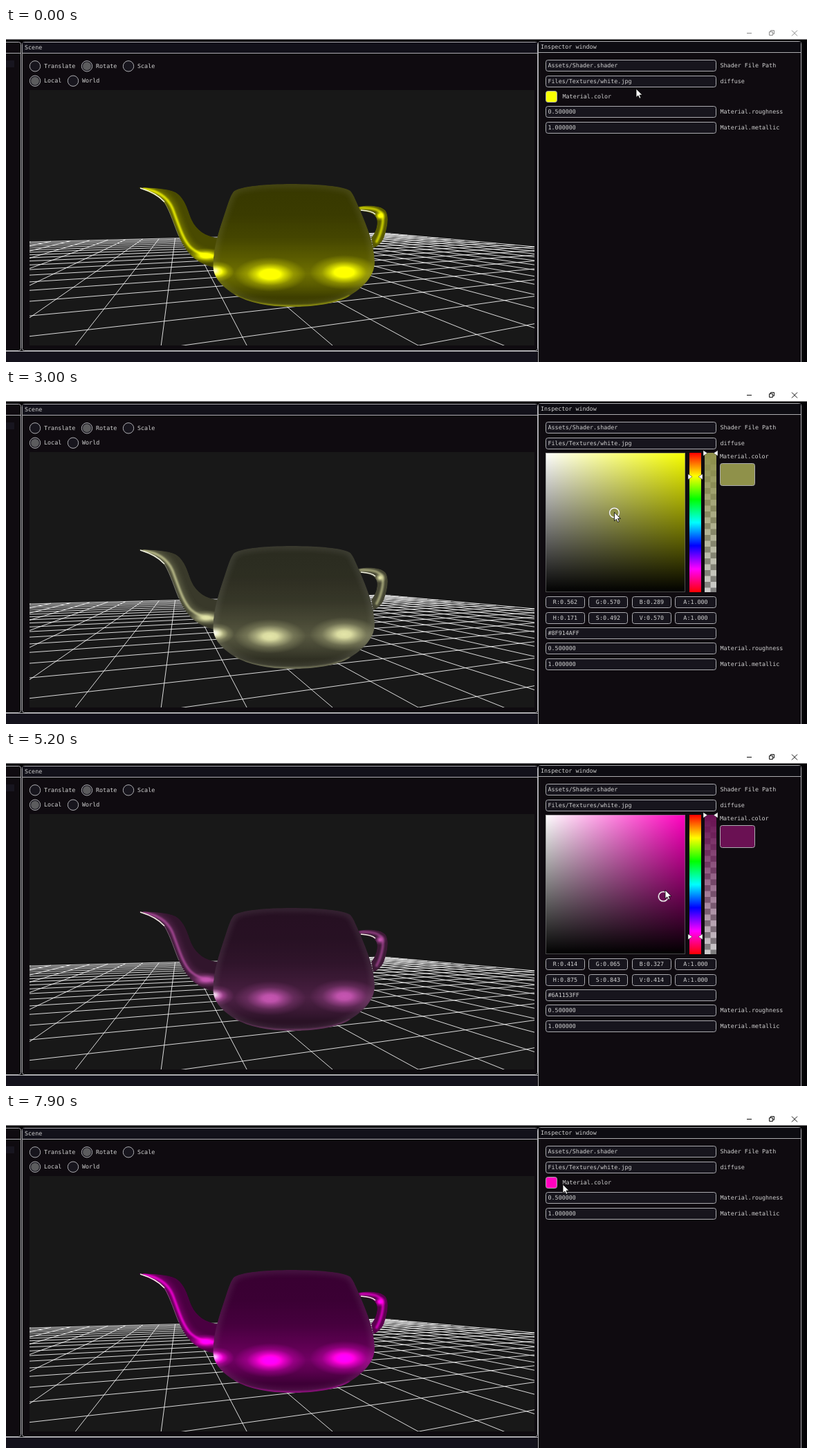
An HTML page for the animation above (8000 ms loop, 1158 by 484 pixels).

```html
<!DOCTYPE html>
<html lang="en">
<head>
<meta charset="utf-8">
<title>Material inspector</title>
<style>
  html, body { margin: 0; width: 100%; height: 100%; overflow: hidden; background: #000; }
  svg { display: block; width: 1158px; height: 484px; }
  text { font: 8.4px "DejaVu Sans Mono", monospace; fill: #d2d2d2; text-rendering: geometricPrecision; white-space: pre; }
  .panel { fill: #0f0b10; stroke: #acacb0; }
  .field { fill: #17151d; stroke: #acacb0; }
  .mid { text-anchor: middle; }
</style>
</head>
<body>
<svg id="stage" viewBox="0 0 1158 484" xmlns="http://www.w3.org/2000/svg"></svg>
<script>
const LOOP = 8000, STEP = 100;
const SV = { x: 780, y: 91, size: 202 };
const stage = document.getElementById("stage");

// ---- markup helpers ----
const label = (x, y, s, extra = "") => `<text x="${x}" y="${Math.floor(y + 3)}" ${extra}>${s}</text>`;
const box = (x, y, w, h, cls, extra = "") =>
  `<rect x="${x + .5}" y="${Math.floor(y) + .5}" width="${w - 1}" height="${h - 1}" rx="3" class="${cls}" ${extra}/>`;
const field = (y, s, name, id = "") =>
  box(780, y - 8, 247, 17, "field") + label(783.5, y, s, id && `id="${id}"`) + label(1032.5, y, name);
const stops = list => list.map(([o, c, a = 1]) =>
  `<stop offset="${o}" stop-color="${c}" stop-opacity="${a}"/>`).join("");
const gray = v => `rgb(${[v, v, v].map(n => Math.round(n * 255))})`;
const radio = (x, y, name, on) =>
  `<circle cx="${x}" cy="${y}" r="7.7" class="field"/>` +
  (on ? `<circle cx="${x}" cy="${y}" r="6" fill="#5c5c5e"/>` : "") + label(x + 13, y, name);

// ---- floor grid in two-point perspective ----
function grid() {
  const vpA = 1608, vpB = 249, horizon = 270, lift = 719;
  const a = .345, b = .948, farU = 16.8, farV = 21.97, near = lift / 320;
  const at = (u, v) => {
    const d = a * u + b * v;
    return `${((a * u * vpA + b * v * vpB) / d).toFixed(1)} ${(horizon + lift / d).toFixed(1)}`;
  };
  let d = "";
  for (let i = 0; i < 50; i++) {
    const u = farU - i, v = farV - i;
    const v0 = (near - a * u) / b;
    if (v0 < farV) d += `M${at(u, v0)}L${at(u, farV)}`;
    const u0 = (near - b * v) / a;
    if (u0 < farU) d += `M${at(u0, v)}L${at(farU, v)}`;
  }
  return `<path d="${d}" fill="none" stroke="#fff" stroke-width=".85"/>`;
}

// ---- teapot: gray shading, tinted by a filter ----
const BODY = "M330 236C342 229 375 226 413 226C452 226 488 229 498 236C503 242 507 253 512 264" +
  "C522 288 533 314 533 340C533 360 515 377 497 388C477 400 445 404 413 404C380 404 350 398 330 386" +
  "C312 375 300 362 299.500 345C299 318 309 290 318 263C322 251 325 241 330 236Z";
const SPOUT = "M191 231C212 232 233 232 245 238C260 247 263 266 269 279C275 292 288 302 306 304" +
  "L306 348C286 345 270 336 259 319C246 299 242 275 230 255C221 243 207 238 191 231Z";
const HANDLE = "M509 259C524 256 543 257 549 265C554 273 552 288 547 302C544 311 538 316 531 319" +
  "L528 304C534 297 538 286 536 277C534 269 524 266 511 265Z";
const SPOUT_LINE = "M198 232.500C218 236 233 243 241 262C250 286 256 307 267 318C277 327 288 331 304 331";
const line = (d, w, c, blur, more = "") =>
  `<path d="${d}" fill="none" stroke="${c}" stroke-width="${w}" filter="url(#blur${blur})" ${more}/>`;
const glow = (x, y, rx, ry) => `<ellipse cx="${x}" cy="${y}" rx="${rx}" ry="${ry}" fill="url(#glow)"/>`;

const teapot = `
  <g filter="url(#tint)">
    <g clip-path="url(#spoutClip)">
      <path d="${SPOUT}" fill="${gray(.25)}"/>
      ${line(SPOUT_LINE, 13, gray(.38), 3)}
      ${line(SPOUT_LINE, 3.4, gray(.8), 1)}
      ${glow(289, 330, 26, 11)}
    </g>
    <g clip-path="url(#handleClip)">
      <path d="${HANDLE}" fill="${gray(.3)}"/>
      ${line("M511 261C527 260 539 262 544 270C547 280 542 299 535 311", 3.5, gray(.7), 1)}
      ${glow(541, 272, 9, 8)}
    </g>
    <g clip-path="url(#bodyClip)">
      <path d="${BODY}" fill="url(#bodyShade)"/>
      ${glow(382, 357, 52, 25)}${glow(489, 354, 50, 25)}${glow(305, 353, 25, 15)}
      ${line("M330 387C350 399 380 403 413 403C445 403 477 399 497 388", 2.5, gray(.52), 1)}
    </g>
  </g>
  <g clip-path="url(#bodyClip)">
    ${line(BODY, 7, "#fff", 5, 'opacity=".12"')}
    <ellipse cx="301" cy="352" rx="13" ry="9" fill="url(#glow)" opacity=".75"/>
  </g>
  ${line("M194 232C211 237 221 243 229 252", 1.6, "#f2f2e4", 0)}
  ${line("M229 252C239 270 243 286 250 302", 1, "#fff", 0, 'opacity=".3"')}
  ${line("M513 264C523 264.500 530 266 534 270", 1.6, "#f2f2e4", 0)}`;

// ---- picker ----
const hueStops = stops(["#f00", "#ff0", "#0f0", "#0ff", "#00f", "#f0f", "#f00"].map((c, i) => [i / 6, c]));
const arrows = (x, w) => `<path d="M${x - 2} -4l6 4l-6 4zM${x + w + 2} -4l-6 4l6 4z" fill="#fff" stroke="#222" stroke-width=".5"/>`;
const cells = [[780, 57], [842, 57], [905, 57], [967, 60]];
const valueRow = (y, id) => cells.map(([x, w], i) =>
  box(x, y - 8, w, 17, "field") + label(x + w / 2, y, "", `class="mid" id="${id}${i}"`)).join("");
const bar = (x, w, fill) => `<rect x="${x}" y="91" width="${w}" height="202" fill="${fill}"/>`;

const picker = `
  ${bar(780, 202, "url(#tone)")}${bar(780, 202, "url(#dark)")}
  <rect x="780.5" y="91.500" width="201" height="201" fill="none" stroke="#777" stroke-opacity=".6"/>
  <circle id="markRim" fill="none" stroke="#808080" stroke-opacity=".6"/>
  <circle id="mark" stroke="#fff" stroke-width="1.3"/>
  ${bar(988, 17, "url(#hues)")}<g id="hueMark">${arrows(988, 17)}</g>
  ${bar(1010, 17, "url(#checks)")}${bar(1010, 17, "url(#fade)")}
  <g transform="translate(0 91.500)">${arrows(1010, 17)}</g>
  ${label(1032, 96, "Material.color")}
  ${box(1032, 106, 51, 33, "field", 'id="bigSwatch"')}
  ${valueRow(307.5, "rgb")}${valueRow(330, "hsv")}
  ${field(352, "", "", "hex")}
  ${field(374.5, "0.500000", "Material.roughness")}${field(397, "1.000000", "Material.metallic")}`;

const compact = `
  ${box(780, 91, 17, 17, "field", 'id="swatch"')}${label(804.5, 99.5, "Material.color")}
  ${field(121.5, "0.500000", "Material.roughness")}${field(144, "1.000000", "Material.metallic")}`;

const clip = (id, d) => `<clipPath id="${id}"><path d="${d}"/></clipPath>`;
const blur = n => `<filter id="blur${n}" filterUnits="userSpaceOnUse" x="150" y="190" width="450" height="250"><feGaussianBlur stdDeviation="${n || .3}"/></filter>`;
const grad = (id, dir, list) => `<linearGradient id="${id}" x1="0" y1="0" x2="${dir === "x" ? 1 : 0}" y2="${dir === "y" ? 1 : 0}">${list}</linearGradient>`;

stage.innerHTML = `
  <defs>
    ${clip("view", "M34 90H764V460H34Z")}${clip("bodyClip", BODY)}${clip("spoutClip", SPOUT)}${clip("handleClip", HANDLE)}
    ${[0, 1, 3, 5].map(blur).join("")}
    <filter id="tint" filterUnits="userSpaceOnUse" x="180" y="215" width="385" height="200" color-interpolation-filters="sRGB">
      <feComponentTransfer>${["R", "G", "B"].map(c => `<feFunc${c} id="tint${c}" type="linear"/>`).join("")}</feComponentTransfer>
    </filter>
    ${grad("bodyShade", "y", stops([[0, .19], [.25, .2], [.45, .24], [.6, .31], [.73, .38], [.82, .31], [.92, .21], [1, .22]].map(([o, v]) => [o, gray(v)])))}
    <radialGradient id="glow">${stops([[0, "#fff"], [.2, "#fff", .93], [.4, "#fff", .58], [.65, "#fff", .22], [1, "#fff", 0]])}</radialGradient>
    ${grad("tone", "x", '<stop offset="0" stop-color="#fff"/><stop id="pure" offset="1"/>')}
    ${grad("dark", "y", stops([[0, "#000", 0], [1, "#000"]]))}
    ${grad("hues", "y", hueStops)}
    ${grad("fade", "y", '<stop id="fade0" offset="0"/><stop id="fade1" offset="1" stop-opacity="0"/>')}
    <pattern id="checks" patternUnits="userSpaceOnUse" x="1010" y="91" width="17" height="17">
      <path d="M0 0H17V17H0Z" fill="#ccc"/><path d="M0 0H8.500V8.500H17V17H8.500V8.500H0Z" fill="#808080"/>
    </pattern>
  </defs>
  <rect width="1158" height="484" fill="#040306"/>
  <rect width="1158" height="16.500" fill="#fff"/>
  <g id="icons" fill="none">
    <path d="M1071 7.500h7M1103.500 5.500h5v5h-5zM1105.500 5.500v-2h5v5h-2M1136 3.500l8 8M1144 3.500l-8 8"/>
  </g>
  ${box(-20, 20, 42, 448, "panel")}<path d="M0 36.500H21" stroke="#acacb0"/>
  <rect y="47" width="12" height="10" fill="#17151f"/>
  ${box(-20, 468, 800, 40, "panel")}<path d="M0 469H768V484H0Z" fill="#14121c"/>
  ${box(23, 20, 746, 448, "panel")}
  <path d="M24 21H768V36H24Z" fill="#12111a"/><path d="M23 36.500H768" stroke="#acacb0"/>
  ${label(27, 28, "Scene")}
  ${radio(42, 55.3, "Translate")}${radio(117, 55.3, "Rotate", 1)}${radio(177, 55.3, "Scale")}
  ${radio(42, 76.7, "Local", 1)}${radio(97, 76.7, "World")}
  <g clip-path="url(#view)"><rect x="34" y="90" width="730" height="370" fill="#181818"/>${grid()}${teapot}</g>
  ${box(769, 19, 381, 500, "panel")}
  <path d="M770 20H1149V35H770Z" fill="#0d0c12"/><path d="M770 35.500H1149" stroke="#acacb0"/>
  ${label(773, 27.5, "Inspector window")}
  ${field(54.5, "Assets/Shader.shader", "Shader File Path")}${field(77, "Files/Textures/white.jpg", "diffuse")}
  <g id="compact">${compact}</g>
  <g id="picker">${picker}</g>
  <path id="cursor" d="M0 0V12.500L2.900 9.900L4.900 14.200L6.900 13.300L5 9.100H8.900Z" fill="#fff" stroke="#000" stroke-width=".8"/>`;

// ---- motion ----
const pointer = [
  [0, 911, 88], [400, 775, 456], [500, 775, 456], [900, 998, 190], [1300, 784, 103], [1500, 784, 103],
  [1600, 786, 102], [2000, 984, 91], [2400, 936, 126], [2500, 920, 141], [2900, 871, 167], [3300, 905, 208],
  [3500, 937, 198], [3800, 993, 166], [4000, 997, 126], [4600, 997, 268], [4700, 997, 268], [5000, 937, 199],
  [5200, 953, 200], [5400, 942, 151], [5700, 986, 80], [5800, 995, 56], [5900, 999, 62], [6100, 999, 62],
  [6500, 900, 484], [6900, 872, 429], [7300, 761, 300], [7800, 788, 108], [7900, 805, 102]
];
const tone = [
  [2000, 1, 1], [2500, .739, .8], [2900, .45, .62], [3300, .62, .42], [3600, .7786, .4676],
  [5000, .7786, .4676], [5200, .843, .414], [5500, .8, .7], [5800, 1, 1]
];
const hue = [[4000, .17148], [4600, .875]];

function sample(track, t) {
  const next = track.findIndex(k => k[0] > t);
  if (next < 0) return track[track.length - 1].slice(1);
  if (!next) return track[0].slice(1);
  const a = track[next - 1], b = track[next], f = (t - a[0]) / (b[0] - a[0]);
  return a.slice(1).map((v, i) => v + (b[i + 1] - v) * f);
}

const hsvToRgb = (h, s, v) => [5, 3, 1].map(n => {
  const k = (n + h * 6) % 6;
  return v - v * s * Math.max(0, Math.min(k, 4 - k, 1));
});
const bytes = rgb => rgb.map(c => Math.round(c * 255));
const css = rgb => `rgb(${bytes(rgb)})`;
const within = (t, a, b) => t >= a && t < b;

const el = {};
stage.querySelectorAll("[id]").forEach(n => el[n.id] = n);
const set = (id, attrs) => { for (const k in attrs) el[id].setAttribute(k, attrs[k]); };
const show = (id, on) => { el[id].style.display = on ? "" : "none"; };

function draw(t) {
  const [x, y] = sample(pointer, t), [s, v] = sample(tone, t), [h] = sample(hue, t);
  const rgb = hsvToRgb(h, s, v), color = css(rgb);
  const open = within(t, 500, 6500);
  const dragging = within(t, 2100, 3600) || within(t, 5000, 5900);

  show("picker", open);
  show("compact", !open);
  set("icons", { stroke: t < 500 || within(t, 6500, 6800) ? "#8a8a8a" : "#111" });
  set("cursor", { transform: `translate(${x} ${y})` });
  ["R", "G", "B"].forEach((c, i) => set("tint" + c, { slope: (1.4 * rgb[i]) ** (1 / 2.2) }));

  set("pure", { "stop-color": css(hsvToRgb(h, 1, 1)) });
  ["fade0", "fade1"].forEach(id => set(id, { "stop-color": color }));
  ["swatch", "bigSwatch"].forEach(id => el[id].style.fill = color);

  const r = dragging ? 6.8 : 4.3;
  const cx = Math.min(SV.x + s * SV.size, 981), cy = Math.max(SV.y + (1 - v) * SV.size, 92);
  set("mark", { cx, cy, r, fill: color });
  set("markRim", { cx, cy, r: r + 1 });
  set("hueMark", { transform: `translate(0 ${SV.y + h * SV.size})` });

  const write = (id, names, vals) => vals.forEach((n, i) =>
    el[id + i].textContent = `${names[i]}:${n.toFixed(3)}`);
  write("rgb", "RGBA", [...rgb, 1]);
  write("hsv", "HSVA", [h, s, v, 1]);
  el.hex.textContent = "#" + [...bytes(rgb), 255]
    .map(n => n.toString(16).padStart(2, "0").toUpperCase()).join("");
}

const start = performance.now();
let shown = -1;
function tick() {
  const t = Math.floor((performance.now() - start) % LOOP / STEP) * STEP;
  if (t !== shown) draw(shown = t);
  requestAnimationFrame(tick);
}
tick();
</script>
</body>
</html>
```
